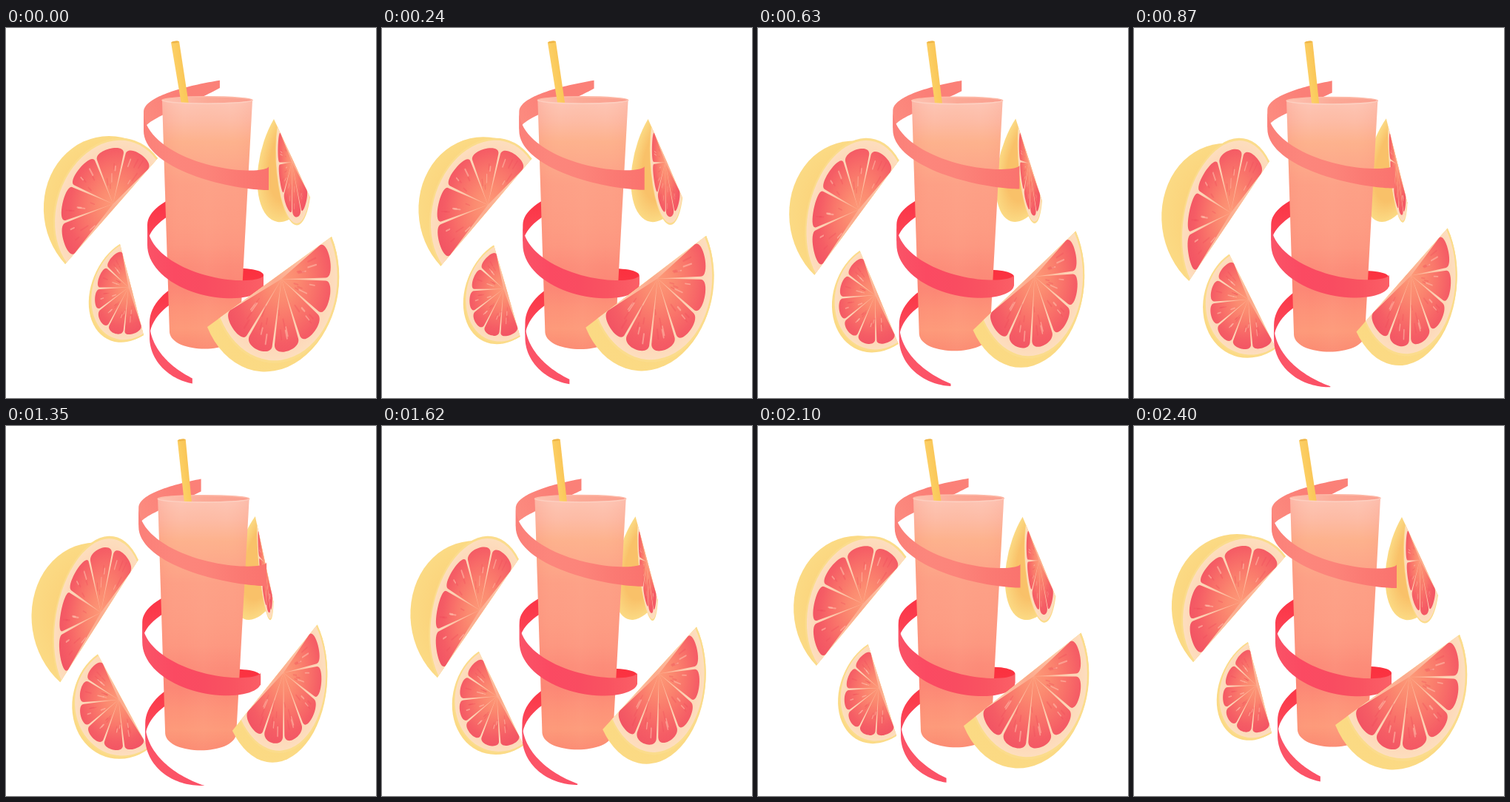
An HTML page with a canvas that plays this animation: 500x500 px, repeating every 2.43 s.

```html
<!DOCTYPE html>
<html lang="en">
<head>
<meta charset="utf-8">
<title>Grapefruit drink</title>
<style>
html, body { margin: 0; width: 100%; height: 100%; overflow: hidden; background: #fff; }
canvas { display: block; width: 500px; height: 500px; }
</style>
</head>
<body>
<canvas id="stage" width="500" height="500"></canvas>
<script>
const ctx = document.getElementById('stage').getContext('2d');
const LOOP = 2430;
const { PI, sin, cos } = Math;
let p = 0; // pose: 0 = turned right, 1 = turned left

const mix = (a, b) => a + (b - a) * p;
const mixAll = ([a, b]) => a.map((x, i) => mix(x, b[i]));

function stops(g, colors) {
  colors.forEach((c, i) => g.addColorStop(i / (colors.length - 1), c));
  return g;
}
const fade = (x0, y0, x1, y1, ...colors) => stops(ctx.createLinearGradient(x0, y0, x1, y1), colors);
const glow = (x, y, ...colors) => stops(ctx.createRadialGradient(x, y, 0, x, y, 1), colors);

// The ribbon winds around the glass: left and right reach of each coil, and its shift at pose 1
const coils = {
  top: { left: [186, 179], right: [355, 352], shift: -3 },
  mid: { left: [191, 184], right: [348, 344], shift: -1 },
  low: { left: [194, 188], right: [348, 344], shift: 4 }
};

// One half turn, from the left side. dir: -1 behind the glass, 1 in front.
// Edges: start height, climb per half turn, bulge. sweep: share of the half turn per pose.
const bands = {
  topBack: { coil: coils.top, dir: -1, upper: [113, 52, 13], lower: [139, 129, -16], sweep: [.57, .49],
    fill: fade(185, 130, 285, 75, '#fc8c80', '#fb7f77', '#fb8178') },
  topFront: { coil: coils.top, dir: 1, upper: [113, 74, 34], lower: [139, 80, 26], sweep: [1, 1],
    fill: fade(185, 0, 355, 0, '#fb8079', '#fc867c', '#fc847a', '#fb7a73', '#fa736e') },
  midBack: { coil: coils.mid, dir: -1, upper: [266, 60, 22], lower: [293, 84, 20], sweep: [1, 1],
    fill: fade(0, 235, 0, 290, '#fb3546', '#fc4658') },
  midFront: { coil: coils.mid, dir: 1, upper: [266, 68, 34], lower: [293, 55, 41], sweep: [1, 1],
    fill: fade(188, 0, 346, 0, '#fa5367', '#fb4a62', '#f94c61', '#f95361', '#fb5f66') },
  lowBack: { coil: coils.low, dir: -1, upper: [398, 64, 35], lower: [418, 71, 32], sweep: [1, 1],
    fill: fade(0, 325, 0, 415, '#fb303e', '#fb3b4b', '#fb4c60') },
  tail: { coil: coils.low, dir: 1, upper: [398, 85, 41], lower: [418, -8, 68], sweep: [.42, .51],
    fill: fade(195, 410, 255, 482, '#fa5167', '#fc5567', '#fb5066') }
};

function band({ coil, dir, upper, lower, sweep, fill }) {
  const left = mix(...coil.left), right = mix(...coil.right);
  const end = mix(...sweep) * PI, steps = 40;
  const point = ([y, climb, bulge], a) => ctx.lineTo(
    (left + right) / 2 - (right - left) / 2 * cos(a),
    y + coil.shift * p + dir * (climb * a / PI + bulge * sin(a)));
  ctx.beginPath();
  for (let i = 0; i <= steps; i++) point(upper, end * i / steps);
  for (let i = steps; i >= 0; i--) point(lower, end * i / steps);
  ctx.fillStyle = fill;
  ctx.fill();
}

// edge: both ends of the cut. rind, face: bulge from the middle of the cut.
// inset: how far the face stays away from each end.
const slices = {
  left: { parts: 5, seed: 3, inset: [0, 0], color: '#fbd47c',
    edge: [[80, 319, 205, 176], [73, 347, 178, 181]],
    rind: [[-67, -72], [-75, -66]], face: [[-48, -68], [-34, -80]] },
  small: { parts: 6, seed: 7, inset: [0, 0], color: '#fbd982',
    edge: [[186, 415, 154, 292], [193, 437, 123, 309]],
    rind: [[-56, 36], [-60, 44]], face: [[-54, 33], [-58, 40]] },
  big: { parts: 6, seed: 11, inset: [.09, 0], color: '#fbd982',
    edge: [[272, 404, 440, 282], [307, 412, 420, 268]],
    rind: [[42, 105], [42, 89]], face: [[41, 101], [40, 86]] },
  edge: { parts: 5, seed: 19, inset: [0, .09], color: '#f9c169',
    edge: [[411, 229, 362, 123], [360, 238, 336, 122]],
    rind: [[-40, 68], [-42, 58]], face: [[-10, 71], [-1, 56]] }
};

// Draws in a space where the piece is the lower half of the unit disc
function inHalf([ax, ay, bx, by], [vx, vy], draw) {
  ctx.save();
  ctx.transform((bx - ax) / 2, (by - ay) / 2, vx, vy, (ax + bx) / 2, (ay + by) / 2);
  draw();
  ctx.restore();
}

function halfDisc(r, fill) {
  ctx.beginPath();
  ctx.arc(0, 0, r, 0, PI);
  ctx.fillStyle = fill;
  ctx.fill();
}

function random(seed) {
  return () => (seed = (seed * 16807) % 2147483647) / 2147483647;
}

const polar = (a, r) => [cos(a) * r, sin(a) * r];

function flesh(parts, seed) {
  const rnd = random(seed * 7919);
  const step = PI / parts, gap = .022;
  const hub = [.08, .06];
  const fill = glow(...hub, '#fd9a78', '#fb8a70', '#f9746a', '#f55d65', '#f15163');
  ctx.lineCap = 'round';
  for (let i = 0; i < parts; i++) {
    const a = i * step + (i && gap), b = (i + 1) * step - (i < parts - 1 && gap);
    const mid = (a + b) / 2;
    ctx.beginPath();
    ctx.moveTo(...hub);
    ctx.lineTo(...polar(a, .79));
    ctx.bezierCurveTo(...polar(a, .95), ...polar(b, .95), ...polar(b, .79));
    ctx.fillStyle = fill;
    ctx.fill();
    for (let k = 0; k < 5; k++) {
      const t = mid + (rnd() - .5) * step * .55, r = .3 + rnd() * .42;
      ctx.beginPath();
      ctx.moveTo(...polar(t, r));
      ctx.lineTo(...polar(t, r + .05 + rnd() * .08));
      ctx.lineWidth = .014 + rnd() * .01;
      ctx.strokeStyle = k % 2 ? 'rgba(255,195,175,.55)' : 'rgba(238,72,88,.3)';
      ctx.stroke();
    }
  }
}

function slice({ parts, seed, inset, color, edge, rind, face }) {
  const [ax, ay, bx, by] = mixAll(edge);
  const dx = bx - ax, dy = by - ay, [s, e] = inset;
  const cut = [ax + dx * s, ay + dy * s, bx - dx * e, by - dy * e];
  inHalf([ax, ay, bx, by], mixAll(rind), () => halfDisc(1, glow(0, 0, color, color, color, '#fbda84')));
  inHalf(cut, mixAll(face), () => {
    halfDisc(1, '#fbdc8c');
    halfDisc(.97, glow(0, 0, '#fca98c', '#fdba9d', '#fdd2b4', '#fddfbf'));
    flesh(parts, seed);
  });
}

function glass() {
  const x0 = mix(211, 205), x1 = mix(333, 328.5), y = mix(97.5, 98.5), ry = 4.7;
  const l = mix(221, 215), r = mix(316, 311), base = mix(411, 416);
  const cx = (x0 + x1) / 2, rx = (x1 - x0) / 2;

  ctx.beginPath();
  ctx.ellipse(cx, y, rx, ry, 0, 0, 2 * PI);
  ctx.fillStyle = fade(x0, 0, x1, 0, '#fdc3b2', '#fba996', '#fa9f8f');
  ctx.fill();
  ctx.lineWidth = 1.6;
  ctx.strokeStyle = '#fdb9a7';
  ctx.stroke();

  // Straw
  const top = mix(228.5, 237.5), foot = mix(242, 246);
  ctx.beginPath();
  ctx.moveTo(top - 5.5, 19.5);
  ctx.quadraticCurveTo(top, 16.5, top + 5.5, 18);
  ctx.lineTo(foot + 5, 103);
  ctx.lineTo(foot - 5, 103);
  ctx.fillStyle = fade(top - 5, 60, foot + 5, 57, '#fdd26c', '#fbcb5d', '#f9c255');
  ctx.fill();
  ctx.beginPath();
  ctx.ellipse(top, 19, 5, 1.3, -.12, 0, 2 * PI);
  ctx.fillStyle = '#eeb548';
  ctx.fill();

  ctx.beginPath();
  ctx.ellipse(cx, y, rx, ry, 0, PI, 0, true);
  ctx.lineTo(r, base);
  ctx.bezierCurveTo(r - 3, base + 30, l + 3, base + 30, l, base);
  ctx.fillStyle = fade(0, y, 0, base + 23, '#fdc6b6', '#fdbca6', '#fdb28d', '#fda98a', '#fda086', '#fd9e85',
    '#fd9c83', '#fd9780', '#fc8c79', '#fc8675', '#fd9278', '#fd9a7a', '#fb8a72');
  ctx.fill();
  ctx.fillStyle = fade(x0, 0, x1, 0, 'rgba(250,120,105,.2)', 'rgba(255,170,140,0)', 'rgba(255,180,150,.1)',
    'rgba(255,170,140,0)', 'rgba(250,125,105,.14)');
  ctx.fill();

  ctx.beginPath();
  ctx.ellipse(cx, y, rx - .5, ry, 0, 0, PI);
  ctx.strokeStyle = '#fdcfc0';
  ctx.stroke();
}

function draw(time) {
  p = (1 - cos(2 * PI * time / LOOP)) / 2;
  ctx.clearRect(0, 0, 500, 500);
  [bands.topBack, bands.midBack, bands.lowBack].forEach(band);
  slice(slices.edge);
  glass();
  slice(slices.small);
  [bands.topFront, bands.midFront, bands.tail].forEach(band);
  slice(slices.left);
  slice(slices.big);
}

const start = performance.now();
function tick() {
  draw(performance.now() - start);
  requestAnimationFrame(tick);
}
tick();
</script>
</body>
</html>
```
